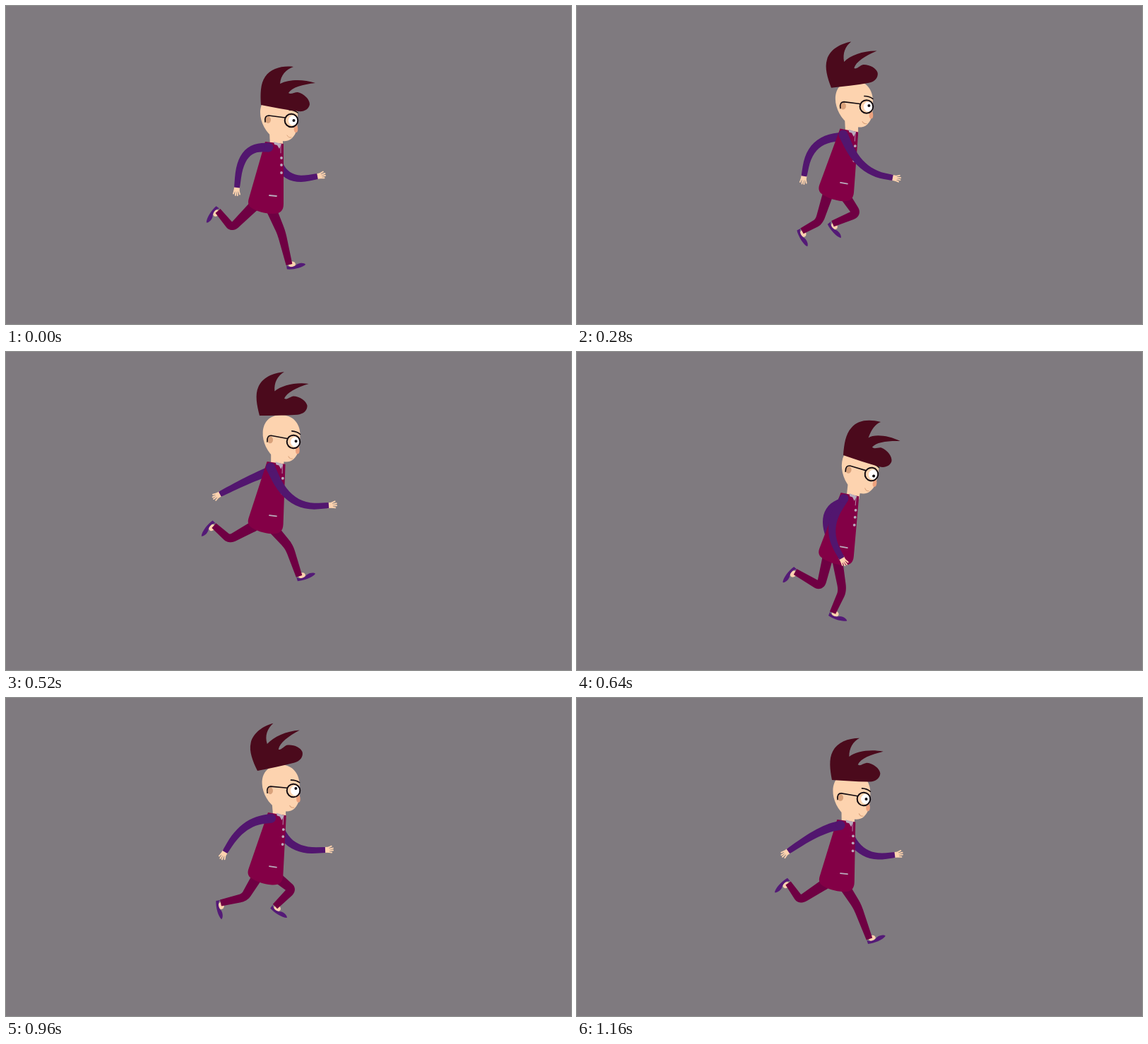
Write an HTML page with a canvas that moves like this. It is 800x450 px and loops after 1200 ms.

```html
<!DOCTYPE html>
<html lang="en">
<head>
<meta charset="utf-8">
<title>Runner</title>
<style>
html, body { margin: 0; width: 100%; height: 100%; overflow: hidden; background: #7f7a7f; }
canvas { display: block; width: 800px; height: 450px; }
</style>
</head>
<body>
<canvas id="stage" width="800" height="450"></canvas>
<script>
const ctx = document.getElementById('stage').getContext('2d');
const LOOP = 1200, STEP = 40;
const color = {
  back: '#7f7a7f', skin: '#fdd3af', shade: '#d9a27b', nose: '#eda27e',
  hair: '#4b0a1c', vest: '#830046', pants: '#6f0043', sleeve: '#52166f',
  shoe: '#541a77', trim: '#b9adbd', ink: '#120b10'
};

// One stride: time, hip y, lean, glasses x y, head turn, hair x y, hair turn, spikiness, gaze
const body = [
  [0,   268, 0,  404, 162, 0,  361, 140, 0,   0,  0],
  [40,  275, 5,  417, 173, 9,  377, 146, 8,   .8, 2],
  [100, 280, 16, 440, 188, 18, 407, 157, 13,  1,  4],
  [160, 276, 12, 429, 176, 14, 390, 145, 7,   1,  4],
  [200, 262, 7,  417, 156, 4,  370, 129, -6,  .6, 1],
  [360, 238, 3,  407, 131, -2, 356, 103, -22, 0,  -3],
  [440, 217, 5,  409, 113, 3,  357, 78,  -17, 0,  -4],
  [480, 217, 4,  408, 114, 3,  357, 70,  -15, 0,  -3],
  [520, 231, 2,  407, 127, 3,  359, 90,  -11, .1, -1],
  [560, 248, 1,  406, 143, 2,  361, 116, -7,  .2, 0]
];

// Full cycle: time, hip x, knee x y, ankle x y, foot turn
const leg = [
  [0,    374, 390, 321, 401, 366, -8],
  [40,   368, 376, 338, 362, 369, 22],
  [100,  362, 364, 338, 340, 370, 28],
  [160,  359, 351, 328, 323, 350, 38],
  [200,  356, 347, 322, 326, 340, 48],
  [360,  355, 338, 282, 304, 290, 80],
  [440,  350, 320, 240, 284, 227, 105],
  [560,  350, 316, 286, 299, 262, 138],
  [600,  350, 320, 314, 300, 290, 127],
  [640,  355, 345, 332, 309, 311, 132],
  [700,  360, 363, 337, 323, 331, 110],
  [760,  364, 374, 334, 343, 337, 83],
  [800,  367, 381, 319, 348, 325, 68],
  [960,  384, 405, 271, 381, 295, 36],
  [1040, 372, 405, 252, 416, 286, -4],
  [1160, 377, 397, 295, 414, 341, -18]
];

// Full cycle: time, elbow x y, wrist x y
const arm = [
  [0,    333, 201, 327, 257],
  [40,   346, 222, 358, 268],
  [100,  358, 245, 378, 272],
  [160,  364, 243, 388, 266],
  [200,  396, 242, 428, 268],
  [280,  401, 234, 447, 243],
  [360,  401, 217, 452, 215],
  [440,  396, 203, 427, 209],
  [520,  402, 221, 457, 217],
  [560,  402, 228, 450, 222],
  [600,  393, 250, 441, 241],
  [640,  352, 250, 375, 292],
  [700,  348, 246, 362, 285],
  [760,  348, 225, 360, 268],
  [800,  329, 207, 344, 260],
  [960,  336, 176, 310, 218],
  [1040, 350, 170, 314, 185],
  [1160, 345, 186, 299, 217]
];

// Smooth periodic interpolation that never overshoots a pose
function pose(table, time, period) {
  const n = table.length, t = time % period;
  const row = i => table[(i + n) % n];
  const when = i => row(i)[0] + Math.floor(i / n) * period;
  let i = 0;
  while (i < n - 1 && table[i + 1][0] <= t) i++;
  const span = when(i + 1) - when(i), u = (t - when(i)) / span;
  return row(i).slice(1).map((a, j) => {
    const c = j + 1, b = row(i + 1)[c];
    const slope = k => (row(k + 1)[c] - row(k)[c]) / (when(k + 1) - when(k));
    const tangent = k => {
      const p = slope(k - 1), q = slope(k);
      return p * q <= 0 ? 0 : 2 * p * q / (p + q);
    };
    const u2 = u * u, u3 = u2 * u;
    return a * (2 * u3 - 3 * u2 + 1) + b * (3 * u2 - 2 * u3) +
      span * (tangent(i) * (u3 - 2 * u2 + u) + tangent(i + 1) * (u3 - u2));
  });
}

function place(x, y, deg, draw) {
  ctx.save();
  ctx.translate(x, y);
  ctx.rotate(deg * Math.PI / 180);
  draw();
  ctx.restore();
}

function shape(d, fill) {
  ctx.fillStyle = fill;
  ctx.fill(new Path2D(d));
}

function line(d, stroke, width) {
  ctx.strokeStyle = stroke;
  ctx.lineWidth = width;
  ctx.lineCap = ctx.lineJoin = 'round';
  ctx.stroke(new Path2D(d));
}

function oval(x, y, rx, ry, fill) {
  ctx.fillStyle = fill;
  ctx.beginPath();
  ctx.ellipse(x, y, rx, ry, 0, 0, 7);
  ctx.fill();
}

const mix = (a, b, u) => [a[0] + (b[0] - a[0]) * u, a[1] + (b[1] - a[1]) * u];

// Tapered tube from a to b, bent at k; bend sets how round the joint is
function limb(a, k, b, wide, thin, bend, fill) {
  const p = mix(k, a, bend), q = mix(k, b, bend), pts = [a];
  for (let i = 0; i <= 12; i++) {
    const u = i / 12;
    pts.push(mix(mix(p, k, u), mix(k, q, u), u));
  }
  pts.push(b);
  const run = [0];
  for (let i = 1; i < pts.length; i++) {
    run.push(run[i - 1] + Math.hypot(pts[i][0] - pts[i - 1][0], pts[i][1] - pts[i - 1][1]));
  }
  const total = run[run.length - 1], left = [], right = [];
  pts.forEach(([x, y], i) => {
    const s = pts[Math.max(0, i - 1)], e = pts[Math.min(pts.length - 1, i + 1)];
    const dir = Math.atan2(e[1] - s[1], e[0] - s[0]);
    const half = (wide + (thin - wide) * run[i] / total) / 2;
    left.push([x - Math.sin(dir) * half, y + Math.cos(dir) * half]);
    right.unshift([x + Math.sin(dir) * half, y - Math.cos(dir) * half]);
  });
  shape('M' + left.concat(right).join('L') + 'Z', fill);
  oval(a[0], a[1], wide / 2, wide / 2, fill);
}

function drawLeg(t, hipY) {
  const [hx, kx, ky, ax, ay, turn] = pose(leg, t, LOOP);
  place(ax, ay, turn, () => {
    oval(4, 0, 5, 4, color.skin);
    shape('M-4 0C-2 4 6 5 11 1C17-1 22 1 23 3C18 7 4 8-4 6Z', color.shoe);
  });
  limb([hx, hipY + 16], [kx, ky], [ax, ay], 15, 9, .2, color.pants);
}

function drawArm(t, shoulder) {
  const [kx, ky, wx, wy] = pose(arm, t, LOOP);
  const turn = Math.atan2(wy - ky, wx - kx) * 180 / Math.PI;
  place(wx, wy, turn, () => {
    shape('M-2-4L5-4L6 4L-2 4Z', color.skin);
    line('M4-3L9-5M5-1L11-2M5 1L11 1M4 3L9 4', color.skin, 1.9);
  });
  limb(shoulder, [kx, ky], [wx, wy], 13, 8, .75, color.sleeve);
}

function drawHead(gaze) {
  shape('M-31 16L-12 22L-12 38L-30 36Z', color.skin);
  shape('M-17-37C-1-37 10-24 9-6C9 10 8 18 1 25C-5 31-17 30-24 25' +
    'C-36 18-44 2-44-11C-44-27-34-37-17-37Z', color.skin);
  oval(-33, -1, 4, 5, color.shade);
  oval(6.5, 12, 2.8, 5, color.nose);
  line('M-6 21Q-4 25 0 24', color.shade, 1);
  oval(2.5, 0, 6.5, 7, '#fff');
  oval(3.5, gaze, 2, 2, color.ink);
  line('M-37 2C-38-4-36-7-32-7L-9-4', color.ink, 1.6);
  line('M-3-15Q4-15 9-11', color.ink, 1.6);
  ctx.lineWidth = 2;
  ctx.beginPath();
  ctx.arc(0, 0, 9.3, 0, 7);
  ctx.stroke();
}

function drawTorso() {
  shape('M-3-76L23-73L23 12C23 22 18 26 8 26C-4 26-16 22-22 18' +
    'C-27 15-28 10-26 4Z', color.vest);
  shape('M9-76L20-73L17-66L14-71L10-72Z', color.trim);
  line('M19-72L19-60', color.trim, .8);
  [-53, -43, -32].forEach(y => oval(20, y, 1.9, 1.9, color.trim));
  line('M3 0L13 1', color.trim, 1.8);
}

function drawHair(c) {
  const notch = `${27 + 6 * c} ${-30 + c}`;
  shape(`M0 0C-1-15-1-30 6-40C${14 - c}-52 ${31 - 4 * c}-56 46-54` +
    `C${35 + 5 * c}-50 ${28 + 8 * c}-42 ${notch}` +
    `C39-36 59-37 77-31C59-29 44-25 39-17C42-14 47-18 52-18` +
    `C61-16 69-8 69-1C68 6 61 10 53 9C35 7 17 3 0 0Z`, color.hair);
}

function draw(t) {
  const [hip, lean, gx, gy, turn, hx, hy, hairTurn, curl, gaze] = pose(body, t, LOOP / 2);
  const a = lean * Math.PI / 180;
  const joint = (x, y) => [
    370 + x * Math.cos(a) - y * Math.sin(a),
    hip + x * Math.sin(a) + y * Math.cos(a)
  ];
  ctx.fillStyle = color.back;
  ctx.fillRect(0, 0, 800, 450);
  drawArm(t + LOOP / 2, joint(9, -66));
  drawLeg(t + LOOP / 2, hip);
  drawLeg(t, hip);
  place(gx, gy, turn, () => drawHead(gaze));
  place(370, hip, lean, drawTorso);
  place(hx, hy, hairTurn, () => drawHair(curl));
  drawArm(t, joint(2, -68));
}

const start = performance.now();
function tick() {
  const t = (performance.now() - start) % LOOP;
  draw(Math.floor(t / STEP) * STEP);
  requestAnimationFrame(tick);
}
tick();
</script>
</body>
</html>
```
